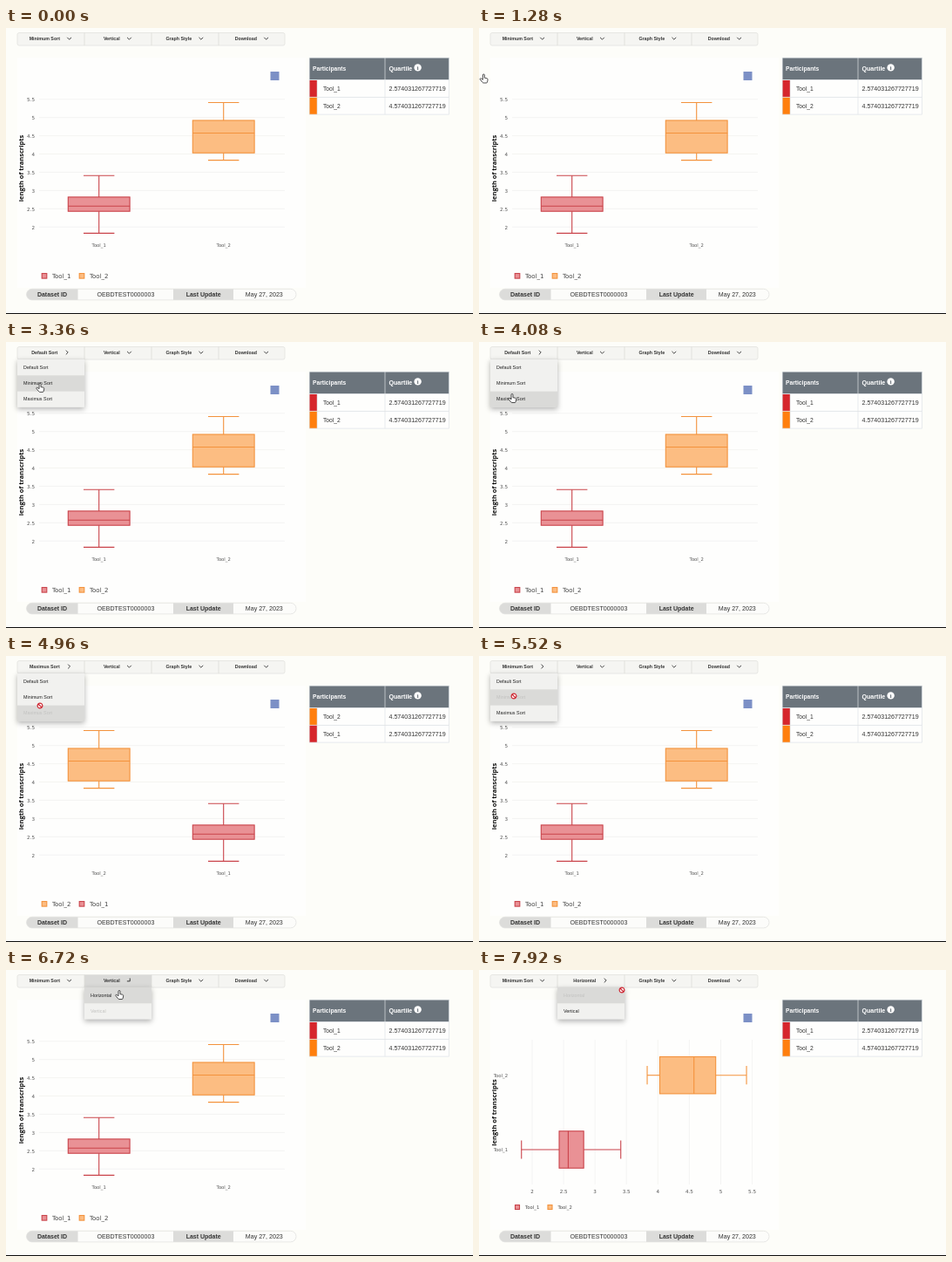
An HTML page with a canvas that plays this animation: 536 by 328 pixels, repeating every 8 s.

```html
<!DOCTYPE html>
<html lang="en">
<head>
<meta charset="utf-8">
<title>Box plot sorting</title>
<style>
  html, body { margin: 0; width: 100%; height: 100%; overflow: hidden; background: #fdfdf9; }
  canvas { display: block; width: 536px; height: 328px; }
</style>
</head>
<body>
<canvas id="stage"></canvas>
<script>
const W = 536, H = 328, LOOP = 8000;
const canvas = document.getElementById('stage');
const ctx = canvas.getContext('2d');
const ratio = window.devicePixelRatio || 1;
canvas.width = W * ratio;
canvas.height = H * ratio;

const SANS = '"Liberation Sans", Arial, sans-serif';
const PLOT = '"DejaVu Sans", Verdana, sans-serif';
const TITLE = '"Open Sans", sans-serif';
const BORDER = '#dee2e6';

const tools = {
  low: { name: 'Tool_1', solid: '#d6262c', line: '#c9434a', fill: '#e99195',
         stats: [1.83, 2.43, 2.574, 2.82, 3.41], quartile: '2.574031267727719' },
  high: { name: 'Tool_2', solid: '#ff7f0e', line: '#f3923c', fill: '#fcbd82',
          stats: [3.83, 4.03, 4.574, 4.92, 5.41], quartile: '4.574031267727719' }
};

// Pointer path: time, x, y
const path = [
  [1120, -8, 70], [1560, 36, 14], [1900, 40, 13], [2240, 41, 25], [2880, 41, 25],
  [3680, 38, 59.5], [4800, 38, 59.5], [4960, 39, 57], [5240, 40, 46],
  [5640, 40, 46], [6000, 82, 35.5], [6080, 91, 34], [6460, 126, 24], [6580, 130, 14],
  [6640, 130, 14], [6720, 130, 23.5], [7440, 130, 24], [7920, 164, 23], [8000, 164, 23]
];

const sortClicks = [[0, 'Minimum Sort'], [2560, 'Default Sort'], [4240, 'Maximus Sort'], [5400, 'Minimum Sort']];
const turnClicks = [[0, 'Vertical'], [7040, 'Horizontal']];
const sortMenu = { x: 13, open: 1560, close: 6080, hover: [1560, 2120], items: ['Default Sort', 'Minimum Sort', 'Maximus Sort'] };
const turnMenu = { x: 90, open: 6580, close: 9000, hover: [6560, 6690], items: ['Horizontal', 'Vertical'] };
const ROW = 18.3, MENU_TOP = 20, CELL = 77;

const clamp = v => Math.max(0, Math.min(1, v));
const latest = (list, t) => list.filter(c => c[0] <= t).pop()[1];
const isOpen = (menu, t) => t >= menu.open && t < menu.close;

function rect(x, y, w, h, color) {
  ctx.fillStyle = color;
  ctx.fillRect(x, y, w, h);
}

function outline(x, y, w, h, color, width = 1) {
  ctx.strokeStyle = color;
  ctx.lineWidth = width;
  ctx.strokeRect(x, y, w, h);
}

function line(x1, y1, x2, y2, color, width = 1) {
  ctx.strokeStyle = color;
  ctx.lineWidth = width;
  ctx.beginPath();
  ctx.moveTo(x1, y1);
  ctx.lineTo(x2, y2);
  ctx.stroke();
}

function text(str, x, y, size, { color = '#333', align = 'left', weight = 400, font = SANS } = {}) {
  ctx.font = `${weight} ${size}px ${font}`;
  ctx.fillStyle = color;
  ctx.textAlign = align;
  ctx.textBaseline = 'alphabetic';
  ctx.fillText(str, x, y + size * 0.36);
}

function pointerAt(t) {
  if (t < path[0][0]) return null;
  const i = path.findIndex(p => p[0] > t);
  if (i < 0) return path[path.length - 1].slice(1);
  const [t0, x0, y0] = path[i - 1], [t1, x1, y1] = path[i];
  const k = (t - t0) / (t1 - t0), e = k * k * (3 - 2 * k);
  return [x0 + (x1 - x0) * e, y0 + (y1 - y0) * e];
}

function hoveredRow(menu, t, p) {
  if (!p || !isOpen(menu, t) || p[0] < menu.x || p[0] > menu.x + CELL) return -1;
  const row = Math.floor((p[1] - MENU_TOP) / ROW);
  return row < menu.items.length ? row : -1;
}

const isDisabled = (item, current) => item === current && item !== 'Default Sort';

function drawChevron(x, y, turn) {
  ctx.save();
  ctx.translate(x, y);
  ctx.rotate(-turn * Math.PI / 2);
  ctx.strokeStyle = '#333';
  ctx.lineWidth = 0.9;
  ctx.beginPath();
  ctx.moveTo(-2.4, -1.2);
  ctx.lineTo(0, 1.2);
  ctx.lineTo(2.4, -1.2);
  ctx.stroke();
  ctx.restore();
}

function drawButton(i, label, menu, t) {
  const x = 13 + i * CELL;
  let turn = 0;
  if (menu) {
    const [from, to] = menu.hover;
    const shade = t < from ? 0 : 1 - clamp((t - to) / 250);
    if (shade > 0) rect(x, 5.5, CELL, 14.5, `rgba(205,205,203,${shade * 0.75})`);
    turn = clamp((t - menu.open) / 280) - clamp((t - menu.close) / 280);
  }
  ctx.font = `700 5.3px ${SANS}`;
  const w = ctx.measureText(label).width;
  const start = x + CELL / 2 - (w + 14.4) / 2;
  text(label, start, 12.1, 5.3, { weight: 700 });
  drawChevron(start + w + 10.7, 12, turn);
}

function drawToolbar(t, sort, turn) {
  const bar = () => { ctx.beginPath(); ctx.roundRect(13, 5.5, 307, 14.5, 2); };
  bar();
  ctx.fillStyle = '#f5f5f2';
  ctx.fill();
  drawButton(0, sort, sortMenu, t);
  drawButton(1, turn, turnMenu, t);
  drawButton(2, 'Graph Style', null, t);
  drawButton(3, 'Download', null, t);
  bar();
  ctx.strokeStyle = '#e2e2df';
  ctx.lineWidth = 0.8;
  ctx.stroke();
  for (let i = 1; i < 4; i++) line(13 + i * CELL, 5.5, 13 + i * CELL, 20, '#dcdcd9', 0.8);
}

function drawMenu(menu, t, current, p) {
  if (!isOpen(menu, t)) return;
  const hover = hoveredRow(menu, t, p);
  ctx.save();
  ctx.shadowColor = 'rgba(0,0,0,0.3)';
  ctx.shadowBlur = 6 * ratio;
  ctx.shadowOffsetY = 2 * ratio;
  rect(menu.x, MENU_TOP, CELL, ROW * menu.items.length, '#f1f1ef');
  ctx.restore();
  menu.items.forEach((item, i) => {
    const y = MENU_TOP + i * ROW;
    if (i === hover) rect(menu.x, y, CELL, ROW, '#dadad8');
    text(item, menu.x + 7, y + 8.6, 5.4, { color: isDisabled(item, current) ? '#c2c2c0' : '#222' });
  });
}

// Draws one box; `at` maps (value, offset across the box) to a point.
function drawBox(tool, at, half) {
  const [min, q1, med, q3, max] = tool.stats;
  const seg = (v1, o1, v2, o2) => line(...at(v1, o1), ...at(v2, o2), tool.line, 1.1);
  const [ax, ay] = at(q1, -half), [bx, by] = at(q3, half);
  rect(ax, ay, bx - ax, by - ay, tool.fill);
  seg(min, 0, q1, 0);
  seg(q3, 0, max, 0);
  seg(min, -half / 2, min, half / 2);
  seg(max, -half / 2, max, half / 2);
  seg(med, -half, med, half);
  outline(ax, ay, bx - ax, by - ay, tool.line, 1.1);
}

function drawLegend(order, y, size, step, box) {
  order.forEach((tool, i) => {
    const x = 44 + i * step;
    rect(x - box / 2, y - box / 2, box, box, tool.fill);
    outline(x - box / 2, y - box / 2, box, box, tool.line, 1.1);
    text(tool.name, x + 9, y, size, { font: PLOT, color: '#444' });
  });
}

function drawAxisTitle(y) {
  ctx.save();
  ctx.translate(17.3, y);
  ctx.rotate(-Math.PI / 2);
  text('length of transcripts', 0, 0, 7.5, { weight: 700, align: 'center', font: TITLE, color: '#111' });
  ctx.restore();
}

const tickStyle = { font: PLOT, color: '#555' };
const ticks = [2, 2.5, 3, 3.5, 4, 4.5, 5, 5.5];

function drawVertical(order) {
  const yOf = v => 81.7 + (5.5 - v) * 41.86;
  for (const v of ticks) {
    line(38, yOf(v), 320, yOf(v), '#f2f2f0', 0.8);
    text(v, 33, yOf(v) + 0.5, 5.6, { ...tickStyle, align: 'right' });
  }
  order.forEach((tool, i) => {
    const x = 106.7 + i * 143;
    drawBox(tool, (v, o) => [x + o, yOf(v)], 35.4);
    text(tool.name, x, 249.2, 5.3, { ...tickStyle, align: 'center' });
  });
  drawAxisTitle(161);
  drawLegend(order, 284.3, 7, 43, 5.6);
}

function drawHorizontal(order) {
  const xOf = v => 61 + (v - 2) * 72.15;
  for (const v of ticks) {
    line(xOf(v), 80, xOf(v), 246, '#f2f2f0', 0.8);
    text(v, xOf(v), 254.3, 5.6, { ...tickStyle, align: 'center' });
  }
  order.forEach((tool, i) => {
    const y = 206 - i * 85.3;
    drawBox(tool, (v, o) => [xOf(v), y + o], 21.2);
    text(tool.name, 33, y + 0.3, 5.3, { ...tickStyle, align: 'right' });
  });
  drawAxisTitle(163.5);
  drawLegend(order, 272, 5.3, 37.5, 5);
}

function drawTable(order) {
  rect(348, 34, 160.5, 25.5, '#6b747c');
  text('Participants', 352, 46.6, 6.7, { color: '#fff', weight: 700 });
  text('Quartile', 439.5, 46.9, 7.1, { color: '#fff', weight: 700 });
  ctx.beginPath();
  ctx.arc(472.6, 45.4, 4.2, 0, 7);
  ctx.fillStyle = '#fff';
  ctx.fill();
  text('i', 472.6, 45.4, 6.6, { color: '#59626a', weight: 700, align: 'center', font: '"Liberation Serif", serif' });
  order.forEach((tool, i) => {
    const y = 59.5 + i * 19.8;
    rect(348, y, 160.5, 19.8, '#fefefd');
    rect(348, y, 9, 19.8, tool.solid);
    text(tool.name, 364, y + 9.8, 6.7);
    text(tool.quartile, 439.5, y + 9.8, 7.1);
    outline(348.2, y, 160.1, 19.8, BORDER, 0.7);
    line(357.2, y, 357.2, y + 19.8, BORDER, 0.7);
  });
  outline(348.2, 34.2, 160.1, 25.3, BORDER, 0.7);
  line(435, 34, 435, 99.1, BORDER, 0.7);
}

function drawInfo() {
  const pill = () => { ctx.beginPath(); ctx.roundRect(23.5, 299.3, 309.5, 12.6, 6.3); };
  ctx.save();
  pill();
  ctx.clip();
  rect(23, 299, 311, 14, '#fcfcfa');
  rect(23, 299, 59.5, 14, '#dcdcda');
  rect(192, 299, 69, 14, '#dcdcda');
  ctx.restore();
  pill();
  ctx.strokeStyle = '#e2e2e0';
  ctx.lineWidth = 0.8;
  ctx.stroke();
  text('Dataset ID', 53, 305.5, 7, { weight: 700, align: 'center' });
  text('OEBDTEST0000003', 137.4, 305.5, 7.1, { align: 'center' });
  text('Last Update', 226.7, 305.5, 7, { weight: 700, align: 'center' });
  text('May 27, 2023', 296.3, 305.5, 7.1, { align: 'center' });
}

const hand = new Path2D('M-1 1q0-1 1-1q1 0 1 1v3.2l2.6.5q1.2.3 1.1 1.6l-.5 2.6q-.2 1.1-1.2 1.1h-3q-.9 0-1.4-.7l-2.6-3.2q-.5-.8.2-1.2q.6-.3 1.2.2l1.6 1.2z');

function drawPointer(p, blocked) {
  ctx.save();
  ctx.translate(...p);
  if (blocked) {
    ctx.beginPath();
    ctx.arc(0, 0, 2.9, 0, 7);
    ctx.fillStyle = '#fff';
    ctx.fill();
    ctx.strokeStyle = '#cf2a35';
    ctx.lineWidth = 1.2;
    ctx.stroke();
    line(-2, -2, 2, 2, '#cf2a35', 1.2);
  } else {
    ctx.fillStyle = '#fff';
    ctx.fill(hand);
    ctx.strokeStyle = '#222';
    ctx.lineWidth = 0.8;
    ctx.stroke(hand);
  }
  ctx.restore();
}

function draw(t) {
  const sort = latest(sortClicks, t), turn = latest(turnClicks, t);
  const order = sort === 'Maximus Sort' ? [tools.high, tools.low] : [tools.low, tools.high];
  const p = pointerAt(t);

  ctx.setTransform(ratio, 0, 0, ratio, 0, 0);
  rect(0, 0, W, H, '#fdfdf9');
  rect(13, 34, 331, 264, '#fefefd');
  if (turn === 'Vertical') drawVertical(order);
  else drawHorizontal(order);
  rect(303.5, 50, 10, 10, '#7c90c6');
  drawTable(order);
  drawInfo();
  rect(0, 327, W, 1, '#0c0c0c');
  drawToolbar(t, sort, turn);
  drawMenu(sortMenu, t, sort, p);
  drawMenu(turnMenu, t, turn, p);

  if (p) {
    const blocked = [[sortMenu, sort], [turnMenu, turn]].some(([menu, current]) => {
      const row = hoveredRow(menu, t, p);
      return row >= 0 && isDisabled(menu.items[row], current);
    });
    drawPointer(p, blocked);
  }
}

const begin = performance.now();
function tick() {
  draw((performance.now() - begin) % LOOP);
  requestAnimationFrame(tick);
}
tick();
</script>
</body>
</html>
```
